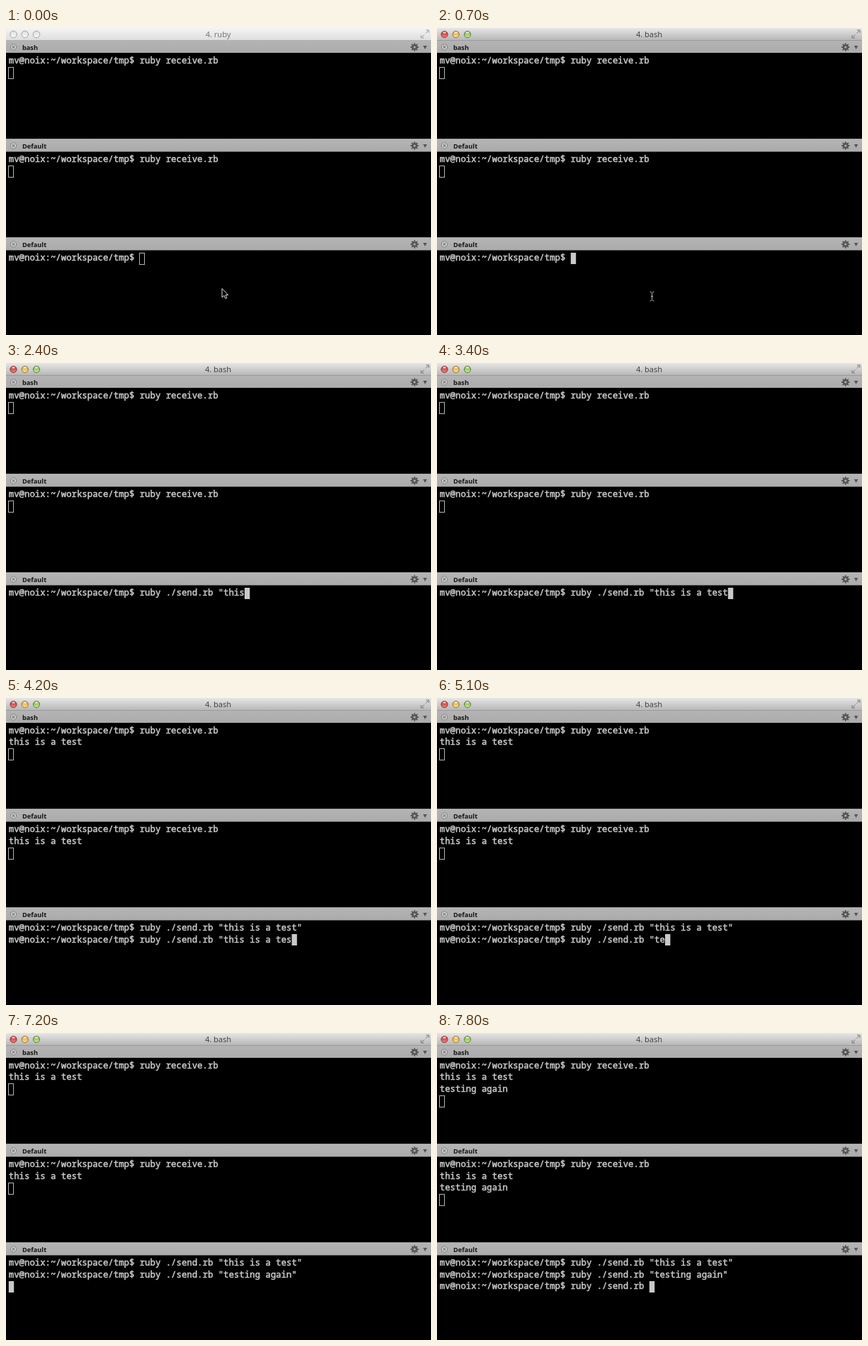
These frames come from a looping animation (600x433 px, 8 s). An HTML page with a canvas:

```html
<!DOCTYPE html>
<html lang="en">
<head>
<meta charset="utf-8">
<title>Terminal panes</title>
<style>
html, body { margin: 0; width: 100%; height: 100%; overflow: hidden; background: #000; }
canvas { display: block; }
</style>
</head>
<body>
<canvas id="stage" width="600" height="433"></canvas>
<script>
const ctx = document.getElementById('stage').getContext('2d');
const W = 600, H = 433, LOOP = 8000;
const LEFT = 3.8, COL = 7.4, ROW = 16.5;
const PANES = [17, 156.5, 295.5];
const PROMPT = 'mv@noix:~/workspace/tmp$ ';
const RECEIVE = PROMPT + 'ruby receive.rb';
const SEND = 'ruby ./send.rb ';
const INK = '#c9c9c9';
const MONO = '12.33px "Noto Sans Mono", "DejaVu Sans Mono", monospace';

const ACTIVE_AT = 200, TYPING_AT = 1100;

// A string is typed, a number deletes that many characters.
const KEYS = [
  [1100, 'ru'], [1200, 'by'], [1300, ' '], [1400, './'], [1500, 'se'],
  [1600, 'nd.rb '], [1800, '"'], [1900, 't'], [2000, 'h'], [2200, 'i'],
  [2400, 's'], [2600, ' '], [2700, 'i'], [2800, 's'], [2900, ' '],
  [3000, 'a'], [3100, ' '], [3200, 't'], [3300, 'es'], [3400, 't'],
  [3500, '"'], [3600, '\n'], [4000, PROMPT],
  [4100, SEND + '"this is a test"'], [4200, 2], [4300, 2],
  [4400, 3], [4500, 3], [4600, 3], [4700, 2],
  [4900, 't'], [5100, 'e'], [5200, 's'], [5400, 't'], [5600, 'i'],
  [5800, 'n'], [6000, 'g'], [6300, ' '], [6500, 'a'], [6600, 'g'],
  [6700, 'a'], [6900, 'i'], [7000, 'n'], [7100, '"'], [7200, '\n'],
  [7600, PROMPT], [7800, SEND]
];
const MESSAGES = [[3900, 'this is a test'], [7500, 'testing again']];
const RUNS = [[0, ACTIVE_AT], [3700, 4000], [7300, 7600]];

function sendLines(t) {
  let text = PROMPT;
  for (const [at, key] of KEYS) {
    if (t < at) break;
    text = typeof key === 'number' ? text.slice(0, -key) : text + key;
  }
  return text.split('\n');
}

function receiveLines(t) {
  const got = MESSAGES.filter(([at]) => t >= at).map(([, text]) => text);
  return [RECEIVE, ...got, ''];
}

function rect(x, y, w, h, fill) {
  ctx.fillStyle = fill;
  ctx.fillRect(x, y, w, h);
}

function disc(x, y, r, fill, stroke) {
  ctx.beginPath();
  ctx.arc(x, y, r, 0, Math.PI * 2);
  ctx.fillStyle = fill;
  ctx.fill();
  if (stroke) {
    ctx.strokeStyle = stroke;
    ctx.lineWidth = 1;
    ctx.stroke();
  }
}

function path(points, close) {
  ctx.beginPath();
  points.forEach(([x, y]) => ctx.lineTo(x, y));
  if (close) ctx.closePath();
}

function label(text, x, y, font, fill, align = 'left') {
  ctx.font = font;
  ctx.fillStyle = fill;
  ctx.textAlign = align;
  ctx.fillText(text, x, y);
}

function vertical(y0, y1, ...stops) {
  const g = ctx.createLinearGradient(0, y0, 0, y1);
  stops.forEach((c, i) => g.addColorStop(i / (stops.length - 1), c));
  return g;
}

function light(x, active, top, bottom, edge) {
  const y = 9;
  if (!active) {
    disc(x, y, 4.8, vertical(4, 14, '#dedede', '#f8f8f8'), '#a2a2a2');
    return;
  }
  disc(x, y, 4.6, vertical(4, 14, top, bottom), edge);
  ctx.beginPath();
  ctx.ellipse(x, 6.4, 2.4, 1.3, 0, 0, Math.PI * 2);
  ctx.fillStyle = 'rgba(255,255,255,.65)';
  ctx.fill();
}

function resizeIcon(active) {
  ctx.strokeStyle = ctx.fillStyle = active ? '#767676' : '#999';
  ctx.lineWidth = 1;
  for (const s of [1, -1]) {
    ctx.save();
    ctx.translate(591.5, 8.5);
    ctx.scale(s, s);
    path([[1, -1], [4.5, -4.5]]);
    ctx.stroke();
    path([[1.5, -5.5], [5.5, -5.5], [5.5, -1.5]]);
    ctx.stroke();
    ctx.restore();
  }
}

function titleBar(t) {
  const active = t >= ACTIVE_AT;
  const running = RUNS.some(([a, b]) => t >= a && t < b);
  rect(0, 0, W, 18, active ? vertical(0, 18, '#e6e6e6', '#b5b5b5')
                           : vertical(0, 18, '#f4f4f4', '#dddddd'));
  rect(0, 17, W, 1, active ? '#9a9a9a' : '#b0b0b0');
  light(10.5, active, '#b8282c', '#f58a80', '#93302e');
  light(26.7, active, '#d6982c', '#fdeb98', '#98702c');
  light(43, active, '#74a83c', '#d0f09a', '#5a7d3a');
  label(running ? '4. ruby' : '4. bash', 299.5, 13,
    '11px "Noto Sans", sans-serif', active ? '#444' : '#777', 'center');
  resizeIcon(active);
}

function gear(x, y) {
  ctx.strokeStyle = '#555';
  ctx.lineWidth = 1.8;
  ctx.beginPath();
  for (let i = 0; i < 8; i++) {
    const a = i * Math.PI / 4, c = Math.cos(a), s = Math.sin(a);
    ctx.moveTo(x + c * 3, y + s * 3);
    ctx.lineTo(x + c * 5.7, y + s * 5.7);
  }
  ctx.stroke();
  disc(x, y, 4, '#555');
  disc(x, y, 1.6, '#b0b0b0');
}

function paneHeader(y, name) {
  rect(0, y, W, 18, vertical(y, y + 18, '#b4b4b4', '#ababab'));
  rect(0, y, W, 1, '#c2c2c2');
  const cy = Math.ceil(y + 9.5);
  disc(10.5, cy, 4.2, '#cfcfcf', '#808080');
  ctx.strokeStyle = '#777';
  ctx.lineWidth = 1.2;
  for (const s of [1, -1]) {
    path([[8.7, cy - 1.8 * s], [12.3, cy + 1.8 * s]]);
    ctx.stroke();
  }
  label(name, 23, cy + 4, 'bold 9.2px "Noto Sans", sans-serif', '#151515');
  gear(576.8, cy);
  path([[588.8, cy - 2], [594.4, cy - 2], [591.6, cy + 3]], true);
  ctx.fillStyle = '#555';
  ctx.fill();
}

function paneText(y, lines, solid) {
  lines.forEach((line, i) => {
    const base = Math.round(y + 32.7 + i * ROW);
    label(line, LEFT, base, MONO, INK);
    // A thin outline gives the medium stroke weight.
    ctx.strokeStyle = INK;
    ctx.lineWidth = 0.5;
    ctx.strokeText(line, LEFT, base);
  });
  const row = lines.length - 1;
  const x = LEFT + lines[row].length * COL;
  const top = Math.round(y + 21 + row * ROW);
  if (solid) {
    rect(x, top, COL, 16, INK);
  } else {
    ctx.strokeStyle = '#b5b5b5';
    ctx.lineWidth = 1;
    ctx.strokeRect(Math.round(x) - 0.5, top + 0.5, 7, 16);
  }
}

function arrow(x, y) {
  path([[0, 0], [0, 12.5], [2.9, 9.9], [4.8, 14.2], [6.8, 13.3],
        [4.9, 9.2], [8.6, 9]].map(([dx, dy]) => [x + dx, y + dy]), true);
  ctx.fillStyle = '#000';
  ctx.fill();
  ctx.strokeStyle = '#e2e2e2';
  ctx.lineWidth = 1;
  ctx.stroke();
}

function iBeam(x, y) {
  ctx.strokeStyle = '#b8b8b8';
  ctx.lineWidth = 1;
  path([[x, y - 5], [x, y + 5]]);
  ctx.stroke();
  path([[x - 1.5, y], [x + 1.5, y]]);
  ctx.stroke();
  for (const s of [-1, 1]) {
    path([[x - 3, y + 6.5 * s], [x - 1, y + 6 * s], [x, y + 5 * s],
          [x + 1, y + 6 * s], [x + 3, y + 6.5 * s]]);
    ctx.stroke();
  }
}

function pointer(t) {
  if (t < ACTIVE_AT) return arrow(305, 367.5);
  if (t >= TYPING_AT) return;
  const p = Math.min(1, (t - ACTIVE_AT) / 300);
  iBeam(305.5 - 2 * p, 382.5 - 4 * p);
}

function draw(t) {
  rect(0, 0, W, H, '#000');
  PANES.forEach((y, i) => paneHeader(y, i ? 'Default' : 'bash'));
  titleBar(t);
  const received = receiveLines(t);
  paneText(PANES[0], received, false);
  paneText(PANES[1], received, false);
  paneText(PANES[2], sendLines(t), t >= ACTIVE_AT);
  pointer(t);
}

const start = performance.now();
function tick() {
  draw((performance.now() - start) % LOOP);
  requestAnimationFrame(tick);
}
tick();
</script>
</body>
</html>
```
